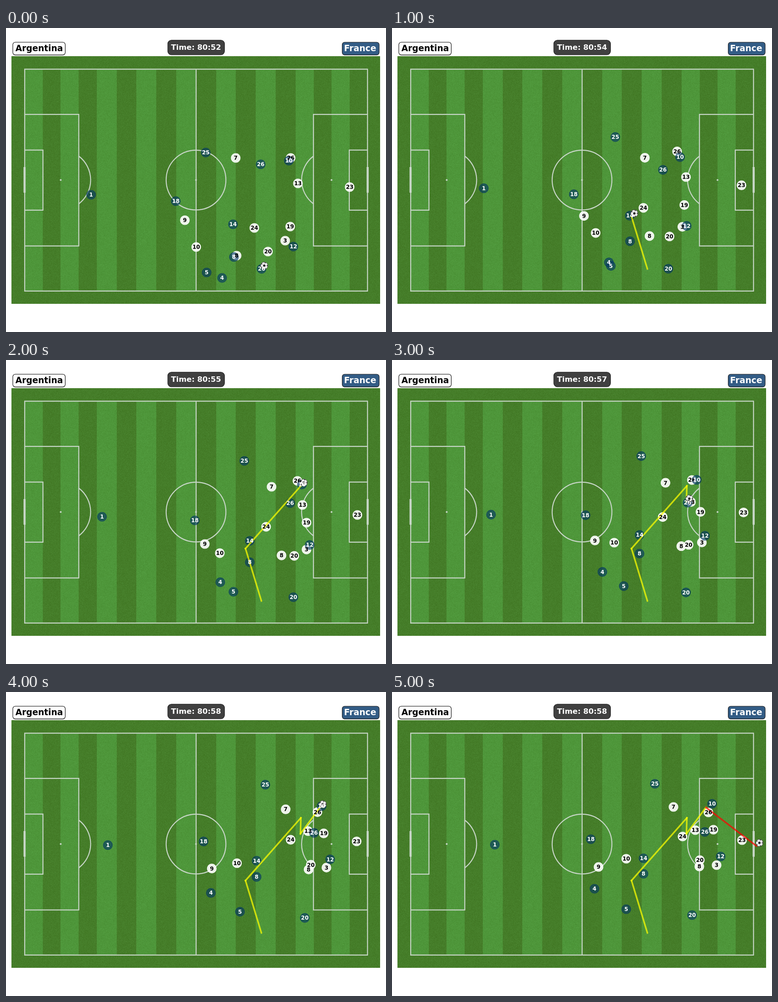
Animation of 837 by 669 pixels, one loop 6 s. Source, as an HTML page with a canvas:

```html
<!DOCTYPE html>
<html lang="en">
<head>
<meta charset="utf-8">
<title>Match replay</title>
<style>
html, body { margin: 0; width: 100%; height: 100%; overflow: hidden; background: #fff; }
canvas, svg { position: absolute; display: block; }
canvas { left: 12px; top: 62px; }
svg { left: 0; top: 0; }
text { font-family: "DejaVu Sans", sans-serif; font-weight: bold; }
.label { font-size: 18.8px; }
#clock { font-size: 16.5px; fill: #fff; text-anchor: middle; }
#numbers text { font-size: 12px; text-anchor: middle; }
#lines { fill: none; stroke: #c8d6c8; stroke-width: 2.2; }
#lines .spot { fill: #c8d6c8; stroke: none; }
#lines .goal { stroke-width: 4.6; }
#passes line { stroke-width: 3.5; stroke-linecap: square; stroke-opacity: .72; }
</style>
</head>
<body>
<canvas id="grass" width="812" height="545"></canvas>
<svg id="stage" width="837" height="669" viewBox="0 0 837 669">
  <g id="lines"></g>
  <g id="discs"></g>
  <g id="passes"></g>
  <g id="ball">
    <circle r="8" fill="#f0f0f0" stroke="#444" stroke-width=".9"/>
    <g id="patches" fill="#222"></g>
  </g>
  <g id="numbers"></g>
  <g stroke-width="1.1">
    <rect x="15" y="31.2" width="115.5" height="28.2" rx="5.6" fill="#fff" stroke="#000"/>
    <rect x="740.5" y="31.2" width="81.5" height="28.2" rx="5.6" fill="#335c85" stroke="#1c1c1c"/>
    <rect x="356.3" y="26.8" width="125" height="32.2" rx="8" fill="#404040" stroke="#181818"/>
  </g>
  <text class="label" x="20.7" y="51">Argentina</text>
  <text class="label" x="744.6" y="51" fill="#fff">France</text>
  <text id="clock" x="418.7" y="48"></text>
</svg>
<script>
const STEP = 1000;
const moments = [52.5, 54.5, 55.9, 57, 58.1, 58.5]; // match seconds after 80:00
const MID = 0.567; // share of the move at which a run passes its middle point

// Shirt number, then where the run starts, passes and ends
const home = [
  [7, [506, 286], [585, 279], [620, 253]],
  [26, [627, 286], [642, 266], [697, 265]],
  [13, [643, 342], [653, 319], [668, 304]],
  [23, [757, 350], [774, 341], [771, 326]],
  [19, [626, 437], [662, 358], [708, 303]],
  [24, [547, 440], [573, 367], [640, 318]],
  [3, [615, 468], [662, 417], [715, 381]],
  [8, [508, 501], [607, 430], [677, 384]],
  [20, [577, 492], [635, 431], [678, 370]],
  [10, [419, 482], [471, 425], [516, 367]],
  [9, [394, 423], [438, 405], [455, 385]]
];
const away = [
  [25, [440, 274], [525, 222], [579, 202]],
  [26, [561, 300], [626, 315], [689, 308]],
  [10, [623, 292], [652, 274], [705, 246]],
  [1, [187.5, 367], [211.5, 345], [226.5, 336]],
  [18, [374, 381], [416, 353], [438, 324]],
  [14, [500, 432], [537, 398], [554, 366]],
  [8, [502, 504], [537, 445], [554, 400]],
  [12, [633, 481], [669, 407], [724, 362]],
  [5, [442, 538], [501, 510], [516, 478]],
  [4, [476, 550], [472, 489], [446, 433]],
  [20, [563, 530], [633, 522], [661, 491]]
];
const passPoints = [[562.5, 530], [527.5, 415], [649.5, 277], [648.5, 312], [691.5, 254], [803, 339]];

const $ = id => document.getElementById(id);

function add(parent, tag, attrs) {
  const el = document.createElementNS("http://www.w3.org/2000/svg", tag);
  for (const key in attrs) el.setAttribute(key, attrs[key]);
  return parent.appendChild(el);
}

function drawGrass() {
  const { width, height } = $("grass");
  const ctx = $("grass").getContext("2d");
  ctx.fillStyle = "#457d29";
  ctx.fillRect(0, 0, width, height);
  ctx.fillStyle = "#4e963a";
  let x = 41;
  for (let i = 0; i < 18; i++) {
    const next = x + (i < 4 || i > 13 ? 39.67 : 43.82);
    if (i % 2 === 0) ctx.fillRect(Math.round(x) - 12, 28.5, Math.round(next) - Math.round(x), 488.5);
    x = next;
  }
  const img = ctx.getImageData(0, 0, width, height), px = img.data;
  let seed = 7;
  const rand = () => (seed = (seed * 1664525 + 1013904223) >>> 0) / 4294967296;
  for (let i = 0; i < px.length; i += 4) {
    const n = (rand() + rand() - 1) * 11;
    px[i] += n * .7;
    px[i + 1] += n;
    px[i + 2] += n * .9;
  }
  ctx.putImageData(img, 0, 0);
}

function drawPitch() {
  const left = 41.2, right = 796.3, centre = 418.75, r = 65.8;
  const g = $("lines");
  const path = (d, cls = "") => add(g, "path", { d, class: cls });
  const spot = cx => add(g, "circle", { cx, cy: 334.5, r: 2, class: "spot" });
  path(`M${left} 90.7H${right}V578.8H${left}ZM${centre} 90.7V578.8`);
  add(g, "circle", { cx: centre - .2, cy: 334.6, r });
  spot(centre - .2);
  for (const [goal, dir] of [[left, 1], [right, -1]]) {
    const area = goal + dir * 119.1, box = goal + dir * 40.2;
    path(`M${goal} 190.1H${area}V479.6H${goal}M${goal} 268.6H${box}V400.8H${goal}`);
    path(`M${area} 282A${r} ${r} 0 0 ${dir > 0 ? 1 : 0} ${area} 387`);
    path(`M${goal - dir * .3} 306V362.5`, "goal");
    spot(goal + dir * 79.3);
  }
}

function drawBall() {
  const g = $("patches");
  const polar = (r, a) => [r * Math.sin(a), -r * Math.cos(a)].map(v => v.toFixed(2)).join(" ");
  const poly = pts => add(g, "path", { d: "M" + pts.join("L") + "Z" });
  const angles = [0, 1, 2, 3, 4].map(i => i * Math.PI * 2 / 5 + .3);
  poly(angles.map(a => polar(3, a)));
  for (const a of angles) {
    poly([polar(7.9, a - .34), polar(5.7, a), polar(7.9, a + .34)]);
    add(g, "path", { d: `M${polar(3, a)}L${polar(5.7, a)}`, stroke: "#777", "stroke-width": .6 });
  }
}

function makeTeam(rows, color, alpha, ink) {
  return rows.map(([num, ...run]) => {
    const disc = add($("discs"), "circle", {
      r: 10, fill: color, stroke: color, "stroke-width": 1.2,
      "fill-opacity": alpha, "stroke-opacity": alpha
    });
    const label = add($("numbers"), "text", { fill: ink, y: 4.3 });
    label.textContent = num;
    return { run, parts: [disc, label] };
  });
}

// Parabola through a at 0, m at MID and b at 1
function curve(a, m, b, u) {
  const bend = (m - a - (b - a) * MID) / (MID * (1 - MID));
  return a + (b - a) * u + bend * u * (1 - u);
}

const moveTo = (el, x, y) => el.setAttribute("transform", `translate(${x} ${y})`);

drawGrass();
drawPitch();
drawBall();
const players = [
  ...makeTeam(home, "#fff", .9, "#000"),
  ...makeTeam(away, "#036", .6, "#fff")
];
const passes = passPoints.slice(1).map(([x2, y2], i) => {
  const [x1, y1] = passPoints[i];
  return add($("passes"), "line", { x1, y1, x2, y2, stroke: i === 4 ? "#f00" : "#ff0" });
});

let shown = -1;
function render(time) {
  const step = Math.floor(time / STEP) % moments.length;
  if (step === shown) return;
  shown = step;
  const first = moments[0], last = moments[moments.length - 1];
  const u = (moments[step] - first) / (last - first);
  $("clock").textContent = "Time: 80:" + Math.floor(moments[step]);
  for (const { run: [a, m, b], parts } of players) {
    const x = curve(a[0], m[0], b[0], u), y = curve(a[1], m[1], b[1], u);
    for (const el of parts) moveTo(el, x, y);
  }
  passes.forEach((line, i) => line.setAttribute("visibility", i < step ? "visible" : "hidden"));
  const [bx, by] = passPoints[step];
  moveTo($("ball"), bx + 6.3, by - 7);
}

const start = performance.now();
function tick() {
  render(performance.now() - start);
  requestAnimationFrame(tick);
}
tick();
</script>
</body>
</html>
```
